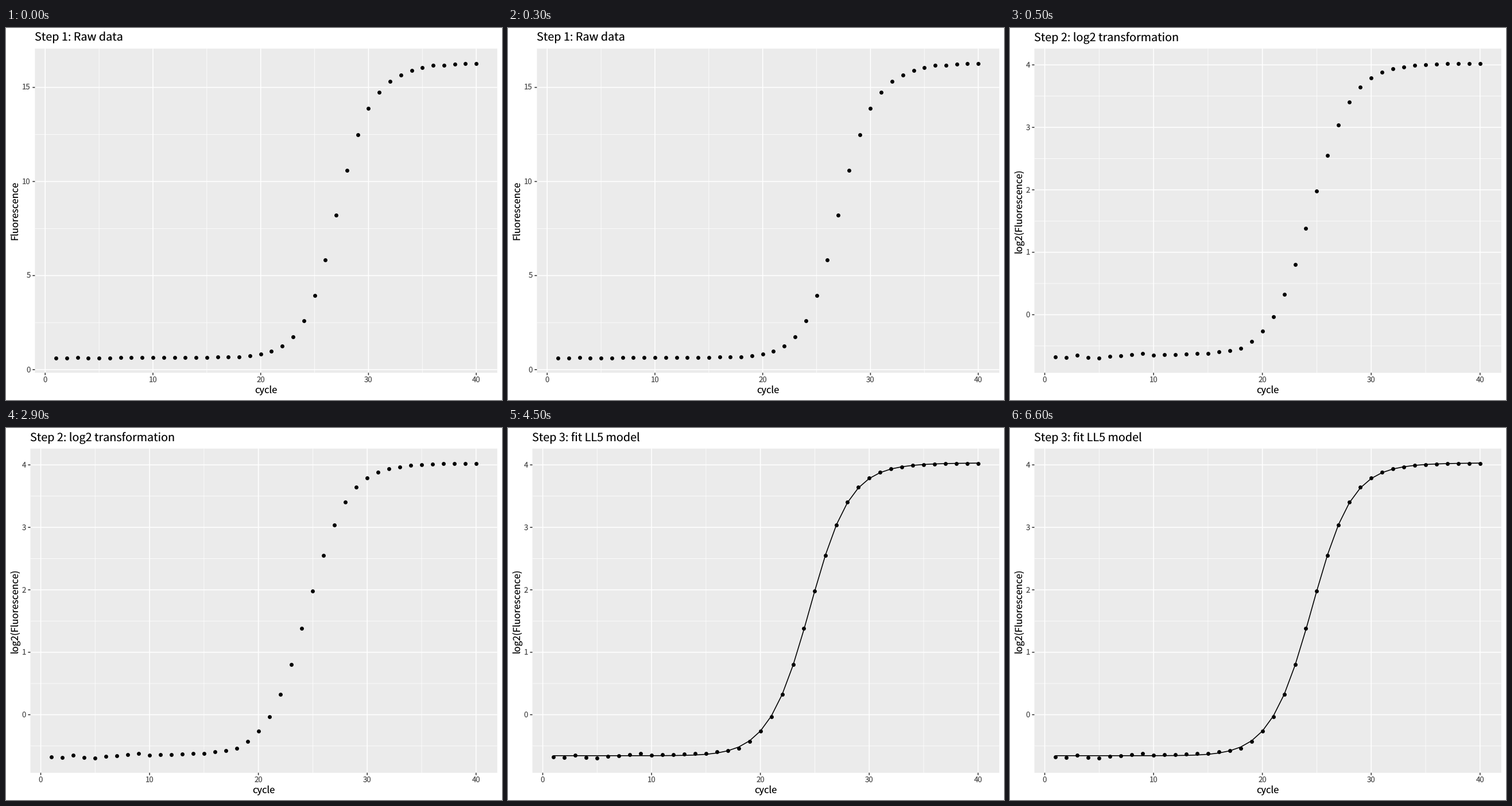
A matplotlib script for the animation above (8000 ms loop, 864 by 648 pixels).

```python
import numpy as np
import matplotlib.pyplot as plt
from matplotlib.animation import FuncAnimation
from matplotlib.patches import Rectangle

W, H, DPI = 864, 648, 108
PX = 72 / DPI  # points per pixel
TOP, RIGHT, BOTTOM = 35.9, 855.75, 600.6
TICK = 4.1

plt.rcParams["font.family"] = "Noto Sans CJK JP"
plt.rcParams["text.hinting"] = "none"

cycle = np.arange(1, 41)
log_f = np.array([
    -.676, -.686, -.646, -.683, -.694, -.664, -.662, -.641, -.625, -.653,
    -.642, -.641, -.634, -.624, -.621, -.594, -.576, -.537, -.432, -.266,
    -.032, .327, .805, 1.381, 1.979, 2.546, 3.037, 3.404, 3.643, 3.795,
    3.883, 3.937, 3.969, 3.990, 4.005, 4.015, 4.017, 4.021, 4.025, 4.023])


def ll5(p):
    """Five-parameter log-logistic curve."""
    b, c, d, e, f = p
    return c + (d - c) / (1 + (e / cycle) ** b) ** f


def fit_ll5(y):
    """Levenberg-Marquardt least squares."""
    p, lam = np.array([15, -.655, 4.03, 25, .8]), .01
    for _ in range(120):
        res = y - ll5(p)
        jac = np.array([(ll5(p + h) - ll5(p)) / 1e-6
                        for h in np.eye(5) * 1e-6]).T
        a = jac.T @ jac
        q = p + np.linalg.solve(a + lam * np.diag(np.diag(a)), jac.T @ res)
        if q[3] > 0 and np.sum((y - ll5(q)) ** 2) < np.sum(res ** 2):
            p, lam = q, lam / 3
        else:
            lam = min(lam * 3, 1e6)
    return ll5(p)


fitted = fit_ll5(log_f)

fig = plt.figure(figsize=(W / DPI, H / DPI), dpi=DPI, facecolor="white")
ax = fig.add_axes([0, 0, 1, 1])


def line(x, y, color, width, z):
    ax.plot(x, y, color=color, lw=width * PX, zorder=z, snap=False,
            solid_capstyle="butt", solid_joinstyle="round")


def label(x, y, s, size, color="black", **kw):
    ax.text(x, y, s, fontsize=size, color=color, va="baseline", **kw)


def plot(title, ylabel, left, y, majors, minors, curve=None):
    def scale(v, lo, hi, start, end):
        pad = .05 * (hi - lo)
        return start + (v - lo + pad) / (hi - lo + 2 * pad) * (end - start)

    def sx(v):
        return scale(v, 1, 40, left, RIGHT)

    def sy(v):
        return scale(v, y.min(), y.max(), BOTTOM, TOP)

    ax.add_patch(Rectangle((left, TOP), RIGHT - left, BOTTOM - TOP,
                           fc="#ebebeb", lw=0, zorder=0, snap=False))

    for xs, ys, width in (((5, 15, 25, 35), minors, .8),
                          ((0, 10, 20, 30, 40), majors, 1.6)):
        for v in ys:
            line([left, RIGHT], [sy(v)] * 2, "white", width, 1 + width)
        for v in xs:
            line([sx(v)] * 2, [TOP, BOTTOM], "white", width, 1 + width)

    for v in (0, 10, 20, 30, 40):
        line([sx(v)] * 2, [BOTTOM, BOTTOM + TICK], "#333333", 1.6, 3)
        label(sx(v), 616.7, str(v), 8.8, "#4d4d4d", ha="center")
    for v in majors:
        line([left - TICK, left], [sy(v)] * 2, "#333333", 1.6, 3)
        label(left - 7.5, sy(v) + 4.8, str(v), 8.8, "#4d4d4d", ha="right")

    ax.plot(sx(cycle), sy(y), "o", color="black", ms=6.9 * PX, mew=0,
            zorder=4, snap=False)
    if curve is not None:
        line(sx(cycle), sy(curve), "black", 1.6, 5)

    label(left, 22.8, title, 13.2, ha="left")
    label((left + RIGHT) / 2, 635.8, "cycle", 11, ha="center")
    label(20.5, (TOP + BOTTOM) / 2, ylabel, 11, ha="center",
          rotation=90, rotation_mode="anchor")


def draw(i):
    ax.clear()
    ax.set_xlim(0, W)
    ax.set_ylim(H, 0)
    ax.axis("off")
    logs = ("log2(Fluorescence)", 42.5, log_f, range(5),
            (-.5, .5, 1.5, 2.5, 3.5))
    if i < 1:
        plot("Step 1: Raw data", "Fluorescence", 50.4, 2 ** log_f,
             (0, 5, 10, 15), (2.5, 7.5, 12.5))
    elif i < 9:
        plot("Step 2: log2 transformation", *logs)
    else:
        plot("Step 3: fit LL5 model", *logs, curve=fitted)


anim = FuncAnimation(fig, draw, frames=16, interval=500, init_func=lambda: None,
                     repeat=True, repeat_delay=0)
plt.show()
```
